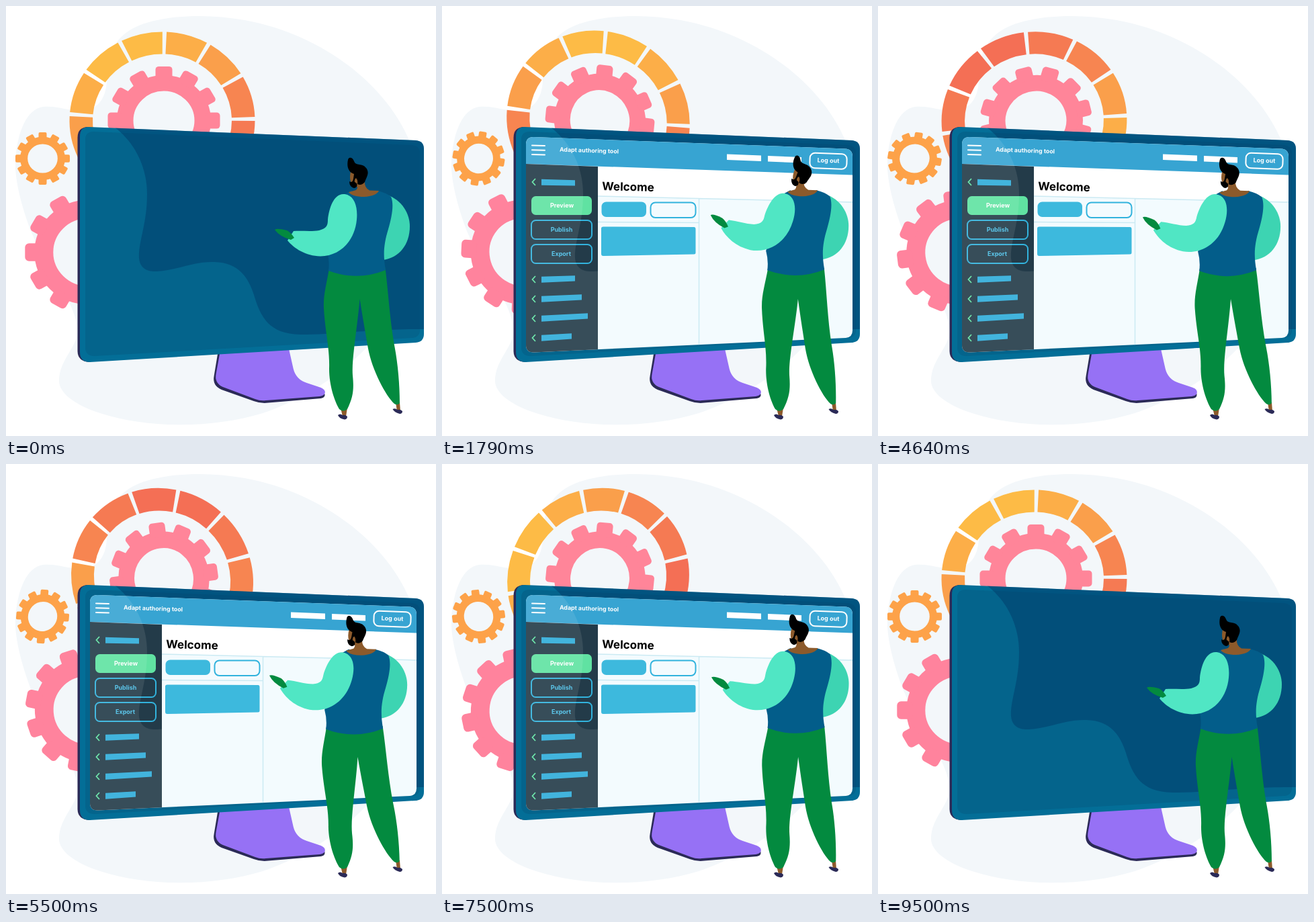
Recreate the animation shown at these times as an HTML page. Size 640 px wide and 640 px high, loop 9.57 s.

```html
<!DOCTYPE html>
<html lang="en">
<head>
<meta charset="utf-8">
<title>Authoring tool</title>
<style>
html, body { margin: 0; width: 100%; height: 100%; overflow: hidden; background: #fff; }
svg { display: block; width: 100%; height: 100%; }
text { font-family: Inter, "Open Sans", sans-serif; font-weight: 700; font-size: 9px; }
</style>
</head>
<body>
<svg viewBox="0 0 640 640">
  <defs>
    <path id="front" d="M123 180 L610 200 Q622 201 622 213 V488 Q622 500 610 501 L125 530 Q110 530 110 515 V194 Q110 180 123 180 Z"/>
    <path id="shade" d="M154 175 C192 200 210 240 210 280 C210 325 197 350 198 375 C199 390 210 396 225 395 C255 393 280 380 310 381 C347 382 361 405 369 430 C379 464 392 488 438 489 C500 489 540 480 630 481 V170 Z"/>
    <clipPath id="frontClip"><use href="#front"/></clipPath>
    <clipPath id="screenClip">
      <path d="M136 195 L600 212.500 Q611 213 611 224 V483 Q611 493 601 494 L137 515.500 Q125 516 125 505 V206 Q125 195 136 195 Z"/>
    </clipPath>
  </defs>

  <path fill="#f3f7fa" d="M150 108 C150 60 172 40 198 29 C240 13 300 11 355 21 C480 44 570 125 601 202 C640 300 620 430 540 505 C495 553 437 588 382 606 C310 628 215 630 140 606 C100 593 79 575 79 558 C79 532 97 516 105 494 C115 455 65 400 37 335 C20 290 13 255 14 230 C17 185 32 153 55 150 C78 148 90 156 113 156 C138 155 150 135 150 108 Z"/>

  <g id="ring" fill="none" stroke-width="34.500"></g>
  <g id="hub" fill="#ff8599" stroke="#ff8599"></g>
  <g id="low" fill="#ff839d" stroke="#ff839d"></g>
  <g id="small" fill="#fda249" stroke="#fda249"></g>

  <g transform="translate(.7 -1)">
    <path fill="#2b2a57" d="M315 515 L420 514 C425 560 440 565 473 576 Q476 584 468 585 L384 592 Q376 592 368 589 L320 572 Q306 566 309 551 Z"/>
    <path fill="#9671f5" d="M318 515 L420 510 L427 541 Q431 557 447 562 L468 569 Q475 572 474 577 Q473 581 466 582 L386 588 Q378 589 370 586 L322 568 Q309 562 312 548 Z"/>
  </g>

  <path fill="#2b2a57" d="M121 180 Q106.500 181 106.500 196 V514 Q107 529 124 530 L130 525 V185 Z"/>
  <use href="#front" fill="#036e97"/>
  <path fill="#04648c" d="M130 187 L604 207 Q616 208 616 219 V482 Q616 493 605 494 L132 521 Q118 521 118 508 V199 Q118 187 130 187 Z"/>
  <use href="#shade" fill="#003b6b" opacity=".5" clip-path="url(#frontClip)"/>

  <g id="ui" clip-path="url(#screenClip)">
    <rect x="125" y="190" width="490" height="330" fill="#f3fbfe"/>
    <path fill="#fff" d="M232 235 L611 250 V292 L232 283 Z"/>
    <path fill="none" stroke="#cbeaf3" stroke-width="1.500" d="M232 283 L611 292 M382.500 287 V505 M232 321.500 L382 322.500"/>
    <path fill="#37a4d2" d="M125 190 H612 V251.500 L125 235 Z"/>
    <path fill="#233b49" d="M125 235 L232 239 V520 H125 Z"/>
    <path stroke="#fff" stroke-width="2" stroke-linecap="round" d="M134 207.500 L153 208 M134 214.300 L153 214.800 M134 221 L153 221.500"/>
    <text transform="translate(175 216.500) rotate(2)" fill="#fff" style="font-size:8.800px">Adapt authoring tool</text>
    <path fill="#fff" d="M424 220.500 L475 222.500 V231 L424 229 Z M485 223 L535 225 V233.500 L485 231.500 Z"/>
    <rect x="547.500" y="219.500" width="55" height="22.500" rx="7.500" fill="none" stroke="#fff" stroke-width="2" transform="rotate(2 575 231)"/>
    <text transform="translate(558.500 232.500) rotate(2)" fill="#fff">Log out</text>
    <text transform="translate(238 274) rotate(1.500)" style="font-size:17px">Welcome</text>

    <rect x="133" y="283" width="90" height="28" rx="6.500" fill="#60e2a2"/>
    <g fill="none" stroke="#32b3dd" stroke-width="2">
      <rect x="133" y="319" width="90" height="28" rx="6.500"/>
      <rect x="133" y="355" width="90" height="28" rx="6.500"/>
      <rect x="310.500" y="292.500" width="67" height="22.500" rx="7"/>
    </g>
    <g text-anchor="middle" fill="#4cc1e8">
      <text x="178.500" y="300" fill="#fff">Preview</text>
      <text x="178" y="336">Publish</text>
      <text x="177.500" y="372">Export</text>
    </g>
    <g id="links"></g>
    <g fill="#3db9dd">
      <rect x="237.500" y="291.500" width="66.500" height="22.500" rx="7"/>
      <path d="M240 328.500 L375 329 Q377.500 329 377.500 332 V367 Q377.500 369.500 375 369.500 L240 372 Q237 372 237 369 V331 Q237 328.500 240 328.500 Z"/>
    </g>
    <path fill="#fff" opacity=".09" d="M154 175 C192 200 210 240 210 280 C210 325 197 350 198 375 C199 390 210 396 225 395 L232 394.500 V520 H120 V175 Z"/>
  </g>

  <g id="feet">
    <path fill="#8c5a2b" d="M498 598 H508 L506 611 H501 Z M580 590 L586 590 L587 603 H582 Z"/>
    <path fill="#2b2a57" d="M494 609 Q497 606 501 609 Q505 608 508 611 Q508 615 504 615.500 Q496 614 494 609 Z M575.500 600 Q579 598 583 601 Q587 600 590 603 Q590 607 586 607 Q578 605 575.500 600 Z"/>
  </g>
  <path id="legs" fill="#038a3f" d="M481 390 C477 415 472 430 473 450 C475 485 482 510 481 540 C481 565 489 588 496 600 Q502 605 508 600 C517 582 518 570 516 550 C514 525 523 480 526.500 436 C531 465 536 492 539 510 C545 542 565 580 578 592 Q583 595 586 591 C586 562 583 530 578 505 C571 465 569 425 564.500 390 Z"/>
  <g id="body">
    <path fill="#3dd4b2" d="M566 281 C590 288 601 310 601 328 C601 355 585 375 561 378 Z"/>
    <path fill="#035d8a" d="M503 281 L514 275 Q534 286 553 275 Q566 278 573 284 C578 295 574 315 569 332 C562 355 561 370 565 393 Q523 410 480 394 Q482 380 478 365 L490 330 Z"/>
    <path fill="#8c5a2b" d="M523 258 L534 260 Q533 270 541 274.500 L555 275 Q551 283 533 284 Q515 284 510 277 L521 274 Q525 270 523 258 Z"/>
    <g id="head">
      <path fill="#8c5a2b" d="M513 246 L525 248 L533 264 L524 270 L516 266 Q510 260 513 246 Z"/>
      <path d="M509 229 C510 224 516 225 518 231 C521 239 530 233 536 241 C542 249 536 255 534 262 Q529 268 523 265 Q524 259 521 256 Q518 258 519 262 L522 264 Q524 270 518 271 Q511 269 511 261 Q516 264 517 257 L518 250 C509 247 507 238 509 229 Z"/>
    </g>
    <g id="arm">
      <path fill="#50e6c4" d="M502 280 C518 280 524 298 522 318 C519 350 497 372 468 372.500 C446 372 429 361 419 349 L428 335 C440 334 454 336 466 334 C477 331 479 327 479 318 C481 300 488 280 502 280 Z"/>
      <path fill="#038a3f" d="M400 333 Q403 330 418 334 Q424 337 429 345 L424 348 Q407 343 400 333 Z"/>
    </g>
  </g>
</svg>
<script>
const NS = 'http://www.w3.org/2000/svg';
const FPS = 14, LOOP = 9570, TURN = 133.5;
const byId = id => document.getElementById(id);

function add(parent, tag, attrs) {
  const node = document.createElementNS(NS, tag);
  for (const k in attrs) node.setAttribute(k, attrs[k]);
  parent.appendChild(node);
}

function buildGear(id, outer, root, hole, width, round) {
  const g = byId(id);
  add(g, 'circle', { r: (root + hole) / 2, fill: 'none', 'stroke-width': root - hole });
  for (let i = 0; i < 12; i++) {
    add(g, 'rect', { x: -width / 2, y: -outer, width, height: outer - root + round + 3,
      rx: round, stroke: 'none', transform: `rotate(${i * 30})` });
  }
}

function buildRing() {
  const half = ['#fdbb46', '#fcae48', '#fa9f4b', '#f78551', '#f57a53', '#f46f55'];
  const colors = half.concat([...half].reverse());
  const r = 120.75, rad = Math.PI / 180;
  const at = deg => `${r * Math.sin(deg * rad)} ${-r * Math.cos(deg * rad)}`;
  // Segments are a little longer at the bottom than at the top
  const gap = i => {
    const deg = -28.5 + i * 30;
    return deg - 2.6 * Math.sin(deg * rad);
  };
  colors.forEach((stroke, i) => {
    add(byId('ring'), 'path', { stroke,
      d: `M${at(gap(i) + 1.3)} A${r} ${r} 0 0 1 ${at(gap(i + 1) - 1.3)}` });
  });
}

function buildLinks() {
  const rows = [[262, 50, 1.5], [407, 50, -1.5], [436, 60, -2.5], [465, 69, -3.5], [494, 45, -2.5]];
  for (const [y, w, tilt] of rows) {
    const top = y - 4.2;
    add(byId('links'), 'path', { fill: 'none', stroke: '#60e2a2', 'stroke-width': 1.8,
      d: `M139 ${y - 5} L134.5 ${y} L139 ${y + 5}` });
    add(byId('links'), 'path', { fill: '#2fadd9',
      d: `M148 ${top} l${w} ${tilt} v8.3 l${-w} ${0.7 - tilt} Z` });
  }
}

const smooth = u => u * u * (3 - 2 * u);

// Eased value between [second, value] keys
function keyed(keys, s) {
  for (let i = 1; i < keys.length; i++) {
    const [t0, v0] = keys[i - 1], [t1, v1] = keys[i];
    if (s <= t1) return v0 + (v1 - v0) * smooth((s - t0) / (t1 - t0));
  }
  return keys[keys.length - 1][1];
}

const SWAY = [[0, 0], [2.4, 5], [5.65, -3.9], [7.8, 5], [9.5, 0]];
const NOD = [[0, 0], [1.7, 12], [4.9, 1.5], [7, 5], [9.5, 0]];
const REACH = [[0, 0], [2.2, 12.3], [5, 10], [6.5, 10.5], [9.5, 0]];
const FADE = [[0, 0], [1.5, 1], [8, 1], [9.5, 0]];

// Wheels are slightly oval, so they wobble as they turn
const WHEELS = [
  ['ring', 232.5, 170.5, 0.957, 1],
  ['hub', 235, 170.5, 0.965, 2],
  ['low', 121.3, 366.5, 0.985, 1],
  ['small', 54.5, 227, 0.96, 3]
];

const move = (id, value) => byId(id).setAttribute('transform', value);

function draw(ms) {
  const step = Math.floor((ms % LOOP) * FPS / 1000 + 0.06);
  const s = step / FPS;
  const turn = 360 * smooth(Math.min(1, step / TURN));
  for (const [id, x, y, oval, laps] of WHEELS) {
    move(id, `translate(${x} ${y}) rotate(${turn * laps}) scale(1 ${oval})`);
  }
  const sway = keyed(SWAY, s);
  const lean = sway / 208;
  move('legs', `matrix(1 0 ${-lean} 1 ${lean * 602} 0)`);
  move('body', `translate(${sway} ${-0.2 * sway})`);
  move('head', `rotate(${keyed(NOD, s)} 530 284)`);
  move('arm', `rotate(${keyed(REACH, s)} 505 300)`);
  byId('ui').setAttribute('opacity', keyed(FADE, s));
}

buildRing();
buildGear('hub', 83.5, 70, 45.5, 25, 5);
buildGear('low', 93, 79, 51, 27, 6);
buildGear('small', 40.5, 33.5, 22.3, 12, 2);
buildLinks();

let begin;
function tick(now) {
  if (begin === undefined) begin = now;
  draw(now - begin);
  requestAnimationFrame(tick);
}
draw(0);
requestAnimationFrame(tick);
</script>
</body>
</html>
```
